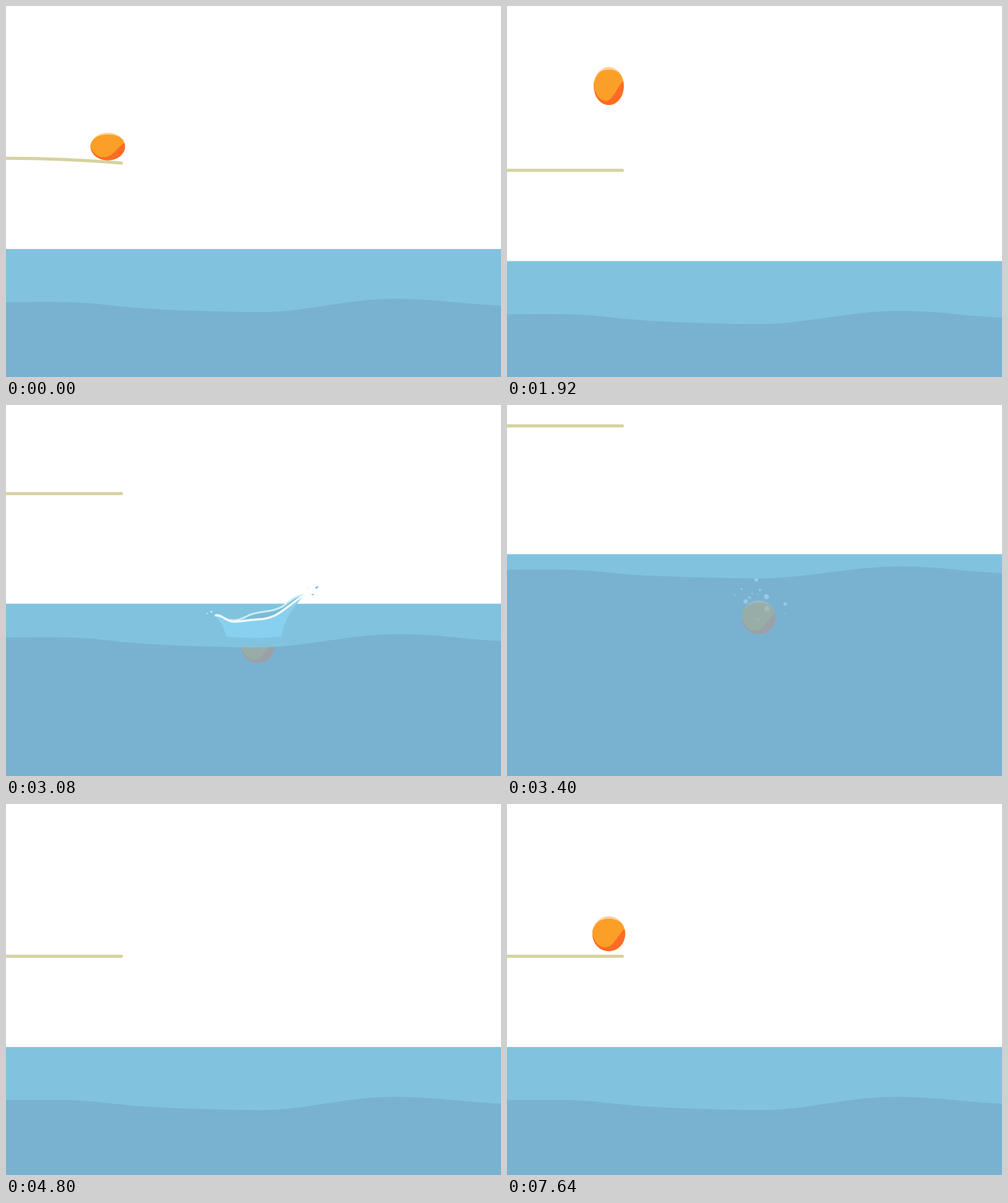
An HTML page for the animation above (7680 ms loop, 800x600 px).

```html
<!DOCTYPE html>
<html lang="en">
<head>
<meta charset="utf-8">
<title>Diving ball</title>
<style>
  html, body { margin: 0; width: 100%; height: 100%; overflow: hidden; background: #fff; }
  svg { display: block; width: 800px; height: 600px; }
</style>
</head>
<body>
<svg viewBox="0 0 800 600">
  <defs>
    <clipPath id="disc"><circle r="27.5"/></clipPath>
    <clipPath id="under"><path id="underPath"/></clipPath>
    <g id="ball" clip-path="url(#disc)">
      <circle r="27.5" fill="#fdd3a0"/>
      <rect x="-28" y="-7" width="56" height="36" fill="#fe6c24"/>
      <path fill="#fc9f27" d="M-28 -2C-25 12 -16 21.5 -6 21.5C8 21.5 16 0 27 -8C23 -19 12 -23.5 1 -23.5C-14 -23.5 -24 -18 -28 -2Z"/>
    </g>
  </defs>
  <path id="board" fill="none" stroke="#d6d2a0" stroke-width="5" stroke-linecap="round"/>
  <use id="dry" href="#ball"/>
  <rect id="water" width="800" height="900" fill="#81c3df"/>
  <path id="wave" fill="#79b2d1"/>
  <g clip-path="url(#under)">
    <g id="ghost"><use id="wet" href="#ball"/></g>
    <g id="bubbles" fill="#d9f0fb"></g>
  </g>
  <g id="splash">
    <path fill="#fff" d="M74 -55Q80 -64 84 -68L92 -66Q90 -56 84 -55Z"/>
    <path fill="#88d0ef" d="M-62 -36Q-48 -20 -44 -2Q0 3 45 -2Q50 -36 82 -68C54 -52 42 -33 14 -30C-4 -29 -15 -26 -32 -26Z"/>
    <path fill="#7bbcd2" d="M-14 -31C4 -43 28 -40 46 -50C58 -57 62 -66 80 -69C54 -52 42 -33 14 -30Z"/>
    <g fill="none" stroke-linecap="round">
      <path stroke="#cdebf6" stroke-width="3" d="M-46 -31C-34 -25 -20 -29 -8 -36C10 -44 28 -40 46 -50C58 -57 62 -66 80 -69"/>
      <path stroke="#effaff" stroke-width="3.5" d="M-61 -36C-50 -38 -46 -26 -32 -26C-15 -27 -4 -29 14 -30C42 -33 54 -52 81 -68"/>
    </g>
    <path fill="#79c4df" d="M99 -81L105 -84L104 -80L101 -79ZM93 -70L98 -71L96 -68Z"/>
    <g fill="#dff4fc">
      <circle cx="-68" cy="-42" r="1.4"/><circle cx="-75" cy="-39" r="1"/><circle cx="88" cy="-81" r="1.2"/>
    </g>
  </g>
</svg>
<script>
const LOOP = 7680, STEP = 40;
const REST = 216.5, EDGE = 164.5, R = 27.5, G = 0.003;
const LEAP = 2200, APEX = 2450, ENTRY = 2870, TOP = 53;
const SURFACE = 393, POOL_X = 407, SINK = 0.197;

const el = id => document.getElementById(id);
const set = (id, name, value) => el(id).setAttribute(name, value);
const show = (id, on) => set(id, "visibility", on ? "visible" : "hidden");
const clamp = v => Math.min(1, Math.max(0, v));
const mix = (a, b, p) => a + (b - a) * p;
const span = (t, a, b) => clamp((t - a) / (b - a));
const ease = (t, a, b) => { const p = span(t, a, b); return p * p * (3 - 2 * p); };

// Two lifts with the jumps, a steady dive, then the way back up
const cameraAt = t =>
  19.5 * ease(t, 600, 1200) + 36.5 * ease(t, 2050, 2460)
  - 478.8 * span(t, 2616, 4014) + 422.8 * ease(t, 4040, 4800);

// Launch time and height of each hop; the board bends in the gaps between them
const hops = [[-256, 21], [150, 80], [765, 127], [1501, 130]].map(([from, height]) => {
  const half = Math.sqrt(2 * height / G);
  return { from, to: from + 2 * half, mid: from + half, height };
});

function airborne(x, y, speed) {
  const stretch = Math.min(0.34 * Math.abs(speed), 0.13) * clamp((Math.abs(REST - y) + 2) / 25);
  return { x, y, sx: 1 - 0.89 * stretch, sy: 1 + stretch, bend: 0 };
}

function pressed(p, depth) {
  const push = depth * Math.sin(Math.PI * p);
  const squash = 0.27 * push ** 0.4, bend = 22 * push;
  return { x: EDGE, y: REST + R * squash + 0.75 * bend, sx: 1 + 0.1 * squash, sy: 1 - squash, bend };
}

function ballAt(t) {
  if (t >= 4800 && t < 7080) {
    const roll = 1 - (1 - span(t, 4880, 6760)) ** 2.28;
    return { x: mix(-28, EDGE, roll), y: REST, sx: 1, sy: 1, bend: 0 };
  }
  if (t >= 7080) t -= LOOP;

  if (t < LEAP) {
    const next = hops.findIndex(h => t < h.to);
    const hop = hops[next];
    if (hop && t >= hop.from) {
      const d = t - hop.mid;
      return airborne(EDGE, REST - hop.height + G * d * d / 2, G * d);
    }
    const last = next < 0 ? hops.at(-1) : hops[next - 1];
    return pressed(span(t, last ? last.to : -600, hop ? hop.from : LEAP), last ? 1 : 0.18);
  }
  if (t < ENTRY) {
    const d = t - APEX;
    const [drop, time] = d < 0 ? [REST - TOP, APEX - LEAP] : [SURFACE - TOP, ENTRY - APEX];
    return airborne(mix(EDGE, POOL_X, span(t, LEAP, ENTRY)), TOP + drop * (d / time) ** 2, 2 * drop * d / time ** 2);
  }
  const slow = 1 - span(t, ENTRY, 3080);
  const y = 493 + SINK * Math.max(0, t - 3080) - (493 - SURFACE) * slow ** 1.4;
  return { x: POOL_X, y, sx: 1 - 0.1 * slow, sy: 1 + 0.1 * slow, bend: 0 };
}

function wavePath(c, t) {
  const drift = ease(t, 0, 1920) - ease(t, 4000, 4800);
  const lift = 5 * clamp((-c - 103) / 247);
  const trough = 405 - 6 * drift, crest = 630 + 7 * drift;
  const y = (v, k = 0) => (v + c - k * lift).toFixed(2);
  return `M0 ${y(479)}C60 ${y(478)} 110 ${y(478)} 140 ${y(481)}` +
    `C180 ${y(485)} 200 ${y(488, 0.3)} 240 ${y(490, 0.5)}` +
    `C300 ${y(493, 0.8)} 350 ${y(494.3, 1)} ${trough} ${y(495, 1)}` +
    `C${trough + 80} ${y(496, 0.7)} ${crest - 85} ${y(473.5)} ${crest} ${y(473.5)}` +
    `C${crest + 60} ${y(473.5)} 740 ${y(482)} 800 ${y(484.5)}V1100H0Z`;
}

let seed = 11;
const random = () => (seed = seed * 16807 % 2147483647) / 2147483647;

// Bubbles leave the sinking ball one after another
const bubbles = Array.from({ length: 42 }, (_, i) => {
  const node = document.createElementNS("http://www.w3.org/2000/svg", "circle");
  const r = 0.9 + 3.4 * random() ** 2;
  node.setAttribute("cx", POOL_X + 56 * (random() + random() - 1));
  node.setAttribute("r", r);
  el("bubbles").append(node);
  const birth = 3150 + i * 17;
  return { node, birth, y: ballAt(birth).y + 20 * (random() - 0.3), rise: 0.03 + 0.015 * r };
});

function drawBubbles(t, c) {
  const fade = 0.35 * (1 - span(t, 4000, 4280));
  for (const b of bubbles) {
    b.node.setAttribute("cy", b.y - b.rise * (t - b.birth) + c);
    b.node.setAttribute("opacity", fade * span(t, b.birth, b.birth + 80));
  }
}

function drawSplash(t, top) {
  const grow = 1 - (1 - span(t, 2860, 3060)) ** 2;
  const sink = ease(t, 3100, 3340);
  show("splash", grow > 0 && sink < 1);
  set("splash", "transform", `translate(400 ${top + 55}) scale(${mix(0.6, 1, grow)} ${grow * (1 - 0.75 * sink)})`);
  set("splash", "opacity", 1 - sink);
}

function draw(t) {
  const c = cameraAt(t);
  const far = Math.max(0, -c);
  const top = SURFACE + c + far * (0.32 - 0.00016 * far);
  const b = ballAt(t);
  const place = `translate(${b.x} ${b.y + c}) scale(${b.sx} ${b.sy})`;
  const boardY = 246.2 + c;
  const path = wavePath(c, t);

  set("board", "d", `M-5 ${boardY}Q95 ${boardY} 186.5 ${boardY + b.bend}`);
  set("water", "y", top);
  set("wave", "d", path);
  set("underPath", "d", path);
  set("dry", "transform", place);
  set("wet", "transform", place);
  show("dry", t < 3000 || t >= 4880);
  set("ghost", "opacity", 0.24 * (t > ENTRY) * (1 - span(t, 4000, 4280)));
  drawBubbles(t, c);
  drawSplash(t, top);
}

const start = performance.now();
function tick() {
  const t = (performance.now() - start) % LOOP;
  draw(Math.floor(t / STEP) * STEP);
  requestAnimationFrame(tick);
}
tick();
</script>
</body>
</html>
```
